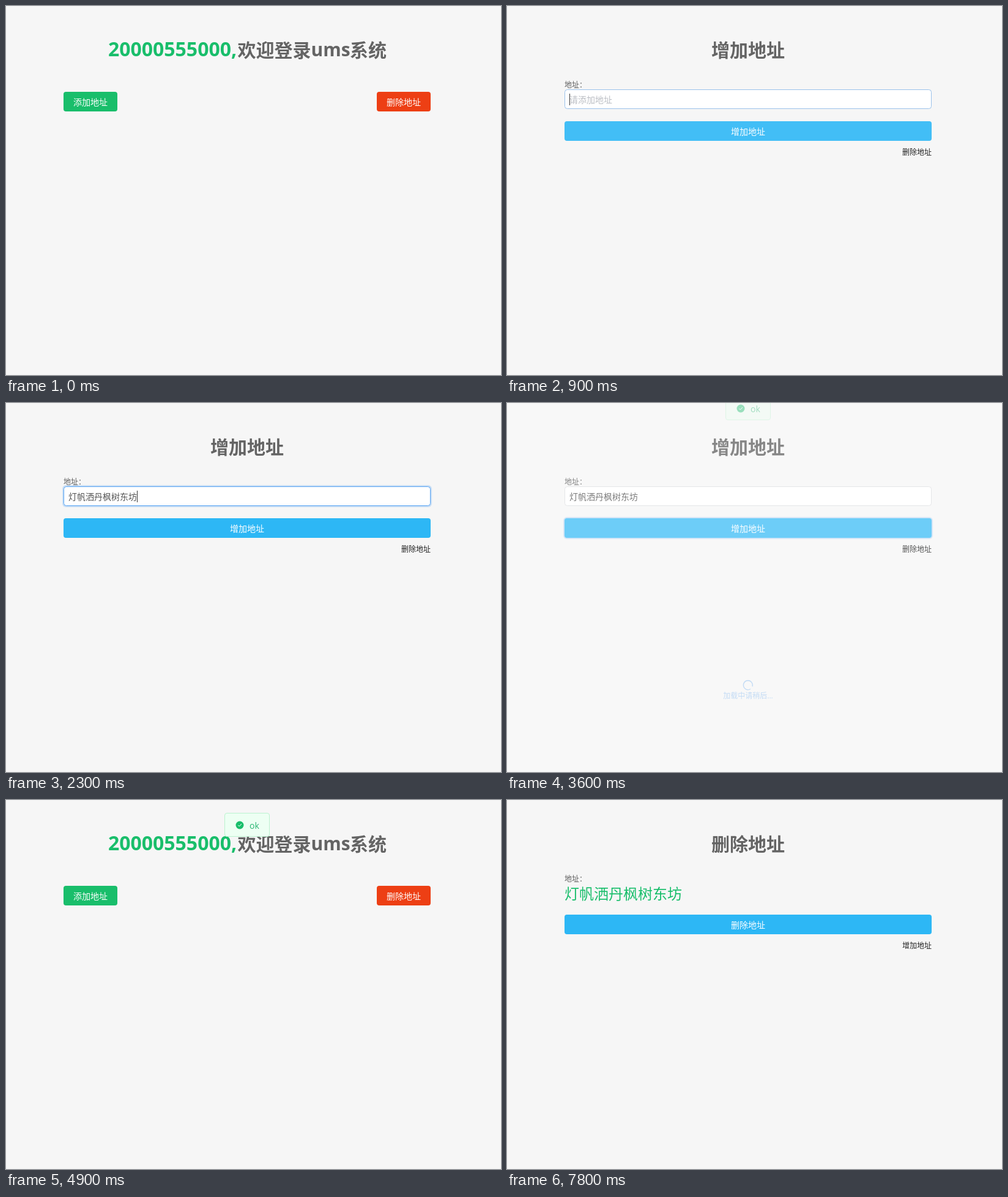
Recreate the animation shown at these times as an HTML page. Size 809 by 602 pixels, loop 8000 ms.

```html
<!DOCTYPE html>
<html lang="zh-CN">
<head>
<meta charset="utf-8">
<title>地址管理</title>
<style>
  html, body { margin: 0; width: 100%; height: 100%; overflow: hidden; background: #f6f6f6; }
  svg { display: block; width: 809px; height: 602px;
        font-family: "Open Sans", "Noto Sans CJK SC", "Noto Sans CJK", sans-serif; }
  text { white-space: pre; }
</style>
</head>
<body>
<svg id="stage" viewBox="0 0 809 602">
  <defs>
    <linearGradient id="panel" x1="0" y1="0" x2="0" y2="1">
      <stop offset="0" stop-color="#f4f8fd"/><stop offset="1" stop-color="#fdfeff"/>
    </linearGradient>
  </defs>
  <g id="scene"></g>
</svg>
<script>
const LOOP = 8000;
const STEP = 100;
const PHONE = '20000555000';
const ADDRESS = '灯帆洒丹枫树东坊';
const KEYS = 'dfsadfsdf';
const GREEN = [25, 190, 107], GREEN_HOVER = [71, 203, 137];
const RED = [237, 63, 20], RED_HOVER = [241, 101, 67];
const BLUE = [45, 183, 245], BLUE_HOVER = [87, 197, 247];
const ACCENT = '#19be6b';
const GREY = '#646464';

// Keys shown in the field and keys known to the input method, per step from 1100 ms.
const TYPING = [[1, 1], [2, 2], [3, 3], [5, 4], [6, 5], [6, 6], [7, 7], [8, 7], [8, 8], [9, 8], [9, 9]];

// Candidates by number of keys; a trailing * adds the check badge.
const CANDIDATES = [
  '的 大 都 到 对',
  '地方 大夫 东方 答复 颠覆',
  '地方撒 大幅上升 东方 地方 大夫',
  '地方撒 地方撒的说法是 东方 地方 大夫',
  '地方撒多 地方撒的说法是的范德萨发撒的发士大夫士大夫撒地方撒多 的分散的* 地方撒',
  '地方撒的发 地方撒的说法是的范德萨发撒的发士大夫士大夫撒 的分散的* 地方撒',
  '地方撒的分散 地方撒的说法是的范德萨发撒的发士大夫 的分散的* 地方撒',
  '灯帆洒丹枫树东 地方撒的说法是的范德萨发撒的发 的分散的* 地方撒',
  ADDRESS + ' 地方撒的发士大夫 地方撒的分散 的分散的大夫 地方撒大夫'
].map(line => line.split(' '));

const scene = document.getElementById('scene');
const pen = document.createElement('canvas').getContext('2d');

const measure = (str, font) => { pen.font = font; return pen.measureText(str).width; };
const mix = (a, b, k) => `rgb(${a.map((v, i) => Math.round(v + (b[i] - v) * k))})`;
const text = (x, y, size, fill, str, attrs = '') =>
  `<text x="${x}" y="${y}" font-size="${size}" fill="${fill}" ${attrs}>${str}</text>`;
const rect = (x, y, w, h, fill, attrs = '') =>
  `<rect x="${x}" y="${y}" width="${w}" height="${h}" fill="${fill}" ${attrs}/>`;
const line = (x1, y1, x2, y2, stroke) =>
  `<path d="M${x1} ${y1}L${x2} ${y2}" stroke="${stroke}"/>`;
const centered = 'text-anchor="middle"';
const bold = 'font-weight="700"';

// Value of the last [time, value] pair reached.
const at = (t, pairs) => pairs.reduce((v, [start, value]) => t >= start ? value : v, 0);

const button = (x, y, w, fill, label) => rect(x, y, w, 32, fill, 'rx="4"')
  + text(x + w / 2, y + 22, 14, '#fff', label, `${centered} font-weight="500"`);
const glow = y => rect(92, y - 2, 604, 36, 'rgba(45,140,240,.22)', 'rx="6"');
const title = str => text(394, 83, 30, GREY, str, `${centered} ${bold}`);
const label = () => text(94, 133, 12, '#5c5c5c', '地址：');
const link = (y, str) => text(646, y, 12, '#222', str);
const caret = x => line(x, 143, x, 162, '#333');

function home(t) {
  const green = t < 4000 ? at(t, [[400, 0.5], [500, 1]]) : 0;
  const red = at(t, [[6000, 0.5], [6100, 1]]);
  return text(167, 82, 32, ACCENT, PHONE + ',', bold)
    + text(378.5, 83, 30, GREY, '欢迎登录', bold)
    + text(498.5, 82, 30, GREY, 'ums', bold)
    + text(562, 83, 30, GREY, '系统', bold)
    + button(94, 140, 88, mix(GREEN, GREEN_HOVER, green), '添加地址')
    + button(606, 140, 88, mix(RED, RED_HOVER, red), '删除地址');
}

function badge(x, y, fill, r) {
  return `<circle cx="${x}" cy="${y}" r="${r}" ${fill ? `fill="${fill}"` : 'fill="none" stroke="#2a7fc0"'}/>`
    + `<path d="M${x - 2.7} ${y}l2 2 3.6-4" fill="none" stroke="${fill ? '#fff' : '#2a7fc0'}"/>`;
}

function inputMethod(count) {
  const keys = KEYS.slice(0, count).match(/sa|./g).join("'");
  const end = Math.round(122.5 + measure(keys, 'bold 16px "Liberation Sans"')) + 0.5;
  let x = 122, row = '';
  CANDIDATES[count - 1].forEach((item, i) => {
    const word = item.replace('*', '');
    const fill = i ? '#0d82d2' : '#e60000';
    row += text(x, 209, 16, fill, `${i + 1}.`, 'font-family="Noto Sans Mono CJK SC, Liberation Mono, monospace"')
      + text(x + 16, 209, 16, fill, word, 'font-weight="300"');
    x += 16 + 16 * word.length;
    if (word !== item) {
      row += badge(x + 5.5, 201, '', 5);
      x += 11;
    }
    x += 13;
  });
  const right = x + 4;
  return rect(111.5, 162.5, right - 112, 55, 'url(#panel)', 'stroke="#9fb4c6"')
    + line(112, 189.5, right - 1, 189.5, '#d3dee8')
    + text(122, 182, 16, '#0a62c4', keys, 'font-weight="700" font-family="Liberation Sans, Arial, sans-serif"')
    + line(end, 168, end, 186, '#222') + row;
}

function field(t) {
  const focus = t < 3300 ? at(t, [[900, 0.5], [1000, 1]]) : 0;
  const border = t < 900 ? '#9cc8f5' : mix([221, 222, 225], [87, 163, 243], focus);
  let out = (focus === 1 ? glow(136) : '')
    + rect(94.5, 136.5, 599, 31, '#fff', `rx="4" stroke="${border}"`);
  const typing = t >= 1100 && t < 2200 && TYPING[(t - 1100) / STEP];
  if (typing) {
    const typed = KEYS.slice(0, typing[0]);
    const end = Math.round(102 + measure(typed, '14.5px "Open Sans"'));
    out += text(102, 158, 14.5, '#555', typed) + line(102, 160.5, end, 160.5, '#333') + caret(end + 0.5);
  } else if (t < 1100) {
    out += text(102, 158, 14, '#bbbec4', '请添加地址') + (t >= 800 ? caret(102.5) : '');
  } else {
    out += text(102, 158, 14, '#555', ADDRESS) + (t >= 2300 && t < 2800 ? caret(214.5) : '');
  }
  return { out, popup: typing ? inputMethod(typing[1]) : '' };
}

function loading(t) {
  const opacity = at(t, [[3300, 0.1], [3400, 0.6], [3500, 0.75], [3600, 0.25], [3700, 0]]);
  if (!opacity) return '';
  return `<g opacity="${opacity}">${rect(0, 0, 809, 602, '#fff', 'opacity=".9"')}
    <path d="M398 466.5A7.5 7.5 0 1 1 401 462.5" fill="none" stroke="#2d8cf0" stroke-width="1.3"
      transform="rotate(${(t - 3600) * 0.36} 394 460)"/>
    ${text(394, 482, 12, '#2d8cf0', '加载中请稍后...', centered)}</g>`;
}

function addPage(t) {
  const hover = at(t, [[700, 0.5], [800, 1], [900, 0.5], [1000, 0], [2800, 0.5], [2900, 1],
    [3300, 0.3], [3400, 0], [3600, 0.5], [3700, 1], [4300, 0]]);
  const { out, popup } = field(t);
  return title('增加地址') + label() + out
    + (t >= 3300 ? glow(188) : '')
    + button(94, 188, 600, mix(BLUE, BLUE_HOVER, hover), '增加地址')
    + link(243, '删除地址') + popup + loading(t);
}

function deletePage(t) {
  const selected = t >= 7400 && t < 7800;
  const address = t < 6400 ? ''
    : (selected ? rect(94, 136, 192, 31, '#3390ff') : '')
      + text(94, 162, 24, selected ? '#fff' : ACCENT, ADDRESS);
  return title('删除地址') + label() + address
    + button(94, 187, 600, mix(BLUE, BLUE_HOVER, 0), '删除地址') + link(242, '增加地址');
}

function message(t) {
  const [dy, opacity] = at(t, [[0, [0, 0]], [3600, [-32, 0.42]], [3700, [-8, 0.88]], [3800, [0, 1]],
    [5000, [-20, 0.5]], [5100, [0, 0]]]);
  if (!opacity) return '';
  return `<g transform="translate(0 ${dy})" opacity="${opacity}">
    ${rect(357.5, 21.5, 73, 38, '#edfff3', 'rx="3.5" stroke="#bbf2cf"')}
    ${badge(382, 41, ACCENT, 6.5)}${text(398, 46.5, 14, '#2bb673', 'ok')}</g>`;
}

function page(t) {
  if (t < 600) return home(t);
  if (t < 4900) return addPage(t);
  return t < 6300 ? home(t) : deletePage(t);
}

let shown = -1;
function frame(now) {
  const t = Math.floor((now % LOOP) / STEP) * STEP;
  if (t !== shown) {
    scene.innerHTML = rect(0, 0, 809, 602, '#f6f6f6') + page(t) + message(t);
    shown = t;
  }
  requestAnimationFrame(frame);
}
frame(0);
</script>
</body>
</html>
```
